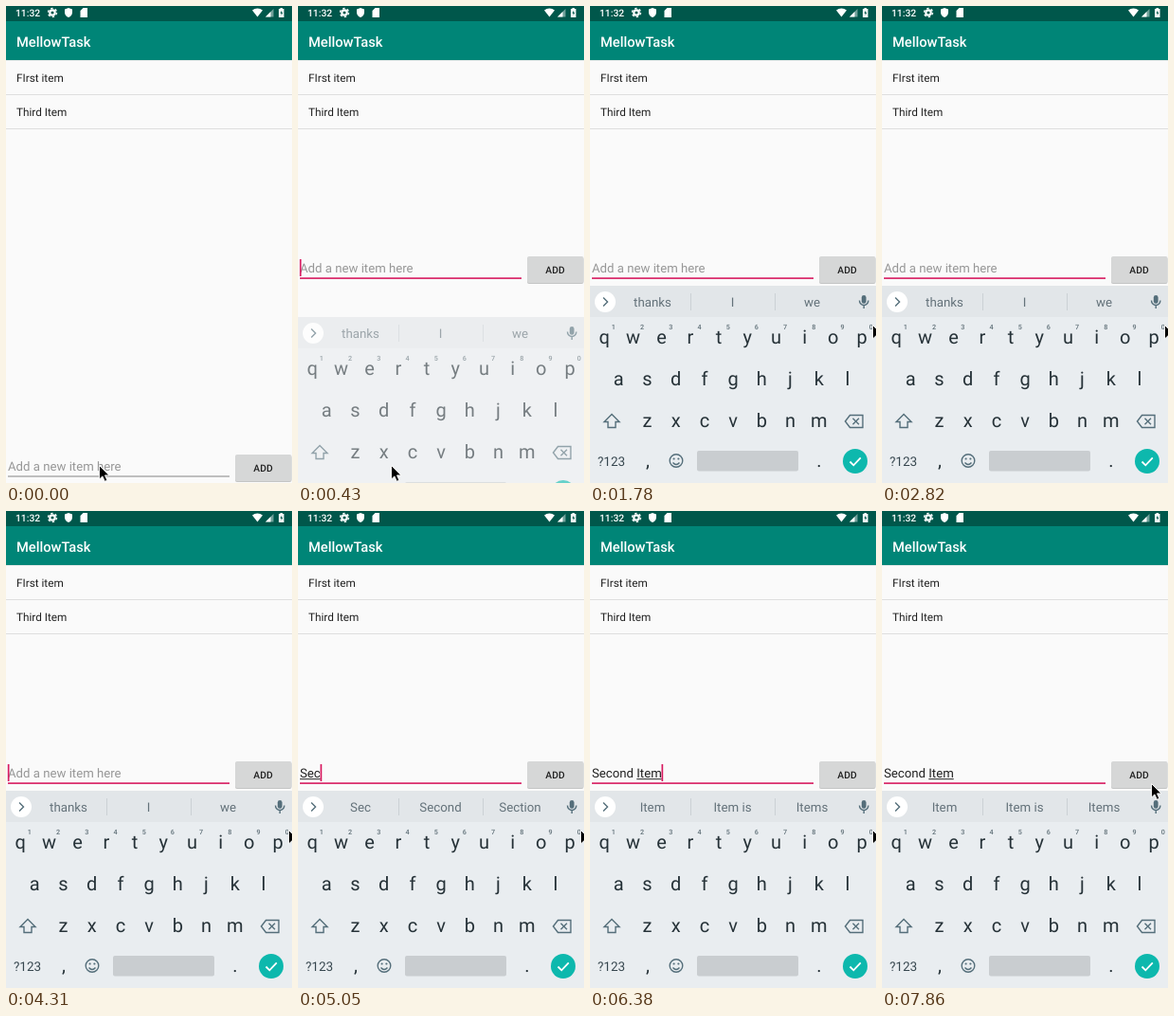
Animation of 302 by 503 pixels, one loop 8 s. Source, as an HTML page:

```html
<!DOCTYPE html>
<html lang="en">
<head>
<meta charset="utf-8">
<title>Todo list</title>
<style>
  html, body { margin: 0; width: 100%; height: 100%; overflow: hidden; background: #fafafa; }
  svg { display: block; width: 302px; height: 503px; }
  text { font-family: Roboto, sans-serif; white-space: pre; text-rendering: geometricPrecision; }
  .mid { text-anchor: middle; }
  .bold { font-weight: 500; }
  .item { font-size: 11.75px; fill: #212121; }
  .field { font-size: 13.2px; }
  .word { font-size: 13.3px; fill: #64727a; }
  .key { font-size: 20px; fill: #263238; }
  .digit { font-size: 7.2px; font-weight: 500; fill: #607078; }
  .line { fill: none; stroke: #546e7a; stroke-width: 1.4; }
</style>
</head>
<body>
<svg viewBox="0 0 302 503">
  <rect width="302" height="503" fill="#fafafa"/>
  <rect y="57" width="302" height="1" fill="#e4e8e8"/>
  <rect width="302" height="57" fill="#008577"/>
  <rect width="302" height="16" fill="#00574b"/>

  <g fill="#fff">
    <text class="bold" x="10" y="11" font-size="10.3">11:32</text>
    <circle cx="49" cy="7" r="2.7" fill="none" stroke="#fff" stroke-width="2.2"/>
    <circle cx="49" cy="7" r="4.5" fill="none" stroke="#fff" stroke-width="1.4" stroke-dasharray="2.356"/>
    <path d="M66 2l4 1.6v3.2c0 2.5-1.7 4.4-4 5.2-2.3-.8-4-2.7-4-5.2V3.600z"/>
    <path d="M81.500 2H86v10h-7.500V5z"/>
    <path d="M260 4.600a8 8 0 0 1 11 0L265.500 11.500z"/>
    <path d="M274 11.500L282.500 3v8.500z" opacity=".45"/>
    <path d="M274 11.500L279.500 6v5.500z"/>
    <path d="M288 3h1.500V2h2.500v1h1.500v9H288z"/>
    <text class="bold" x="11" y="42.500" font-size="14.7">MellowTask</text>
  </g>
  <path d="M291.200 4.500l-1.700 3.300h1.200v2.200l1.700-3.300h-1.200z" fill="#00574b"/>

  <text class="item" x="11" y="79.500">FIrst item</text>
  <text class="item" x="11" y="116">Third Item</text>
  <path d="M0 93.500h302M0 129.500h302" stroke="#dedede"/>

  <g id="entry">
    <rect id="rule" x="2" width="234"/>
    <text id="hint" class="field" x="2" y="281" fill="#979797">Add a new item here</text>
    <text id="typed" class="field" x="2" y="281" fill="#212121"></text>
    <rect id="compose" y="282.200" height="1" fill="#212121"/>
    <rect id="caret" y="267" width="1.700" height="18" fill="#d81b60"/>
    <rect x="242" y="265" width="59.500" height="28" rx="2" fill="#c4c5c5"/>
    <rect x="242" y="264" width="59.500" height="28" rx="2" fill="#d6d7d7"/>
    <text class="mid bold" x="271.500" y="281.500" font-size="10.3" fill="#212121">ADD</text>
  </g>

  <g id="board">
    <rect y="295" width="302" height="208" fill="#e9edf0"/>
    <rect y="295" width="302" height="33" fill="#e2e6e9"/>
    <circle cx="16" cy="312" r="11" fill="#fff"/>
    <path class="line" d="M14 307.500l4.500 4.500-4.500 4.500"/>
    <path d="M106.500 303v18M195.500 303v18" stroke="#cbd1d5"/>
    <g id="words"></g>
    <rect x="286.800" y="305" width="4.800" height="8.800" rx="2.400" fill="#546e7a"/>
    <path class="line" stroke-width="1.3" d="M284.500 310.500a4.700 5 0 0 0 9.400 0M289.200 315.500v3.500"/>
    <g id="keys"></g>
    <path class="line" d="M23 430.500l-8 8h4v6h8v-6h4z"/>
    <path class="line" d="M269.500 438l5-6.500h13.500v13h-13.500zM277.500 434.700l6.500 6.500m0-6.500l-6.500 6.500"/>
    <text class="mid" x="22.500" y="484.500" font-size="13.500" fill="#37474f">?123</text>
    <text class="mid key" x="61" y="486" font-size="18">,</text>
    <text class="mid key" x="242" y="486" font-size="18">.</text>
    <circle class="line" cx="91" cy="479.500" r="6.800"/>
    <path class="line" d="M87.500 481.500q3.500 4 7 0"/>
    <circle cx="88.600" cy="477.500" r="1.100" fill="#546e7a"/>
    <circle cx="93.400" cy="477.500" r="1.100" fill="#546e7a"/>
    <rect x="113" y="469" width="107" height="21.500" rx="2" fill="#c9cdd0"/>
    <circle cx="280" cy="480" r="13" fill="#0db8ad"/>
    <path d="M274.500 480.500l3.800 3.800 7.500-8" fill="none" stroke="#fff" stroke-width="1.800"/>
  </g>

  <path id="mouse" d="M0 0V14.500L3.400 11.400 5.800 16.800 8.400 15.700 6 10.400H10.500z" fill="#000" stroke="#fff" stroke-width=".9"/>
</svg>

<script>
const LOOP = 8000;
const $ = id => document.getElementById(id);

function label(parent, cls, x, y, str) {
  const el = document.createElementNS('http://www.w3.org/2000/svg', 'text');
  el.setAttribute('class', cls);
  el.setAttribute('x', x);
  el.setAttribute('y', y);
  el.textContent = str;
  parent.append(el);
  return el;
}

function set(el, attrs) {
  for (const name in attrs) el.setAttribute(name, attrs[name]);
}

const show = (el, on) => set(el, { visibility: on ? 'visible' : 'hidden' });

// Each row: letters, first centre, baseline
[['qwertyuiop', 15.2, 356], ['asdfghjkl', 30.3, 399.5], ['zxcvbnm', 60.5, 443.5]].forEach(([row, x, y], r) => {
  [...row].forEach((ch, i) => {
    const cx = x + i * 30.2;
    label($('keys'), 'mid key', cx, y, ch);
    if (r === 0) label($('keys'), 'mid digit', cx + 9.700, 341, (i + 1) % 10);
  });
});
const words = [66, 150.5, 234.5].map(x => label($('words'), 'mid word', x, 316.500, ''));

// Tracks of [start time, value]; a value holds until the next one
const mouse = [
  [0, [98.5, 484.5]], [1180, [205, 412]], [1330, [298.5, 336.5]],
  [7570, [295, 322]], [7720, [287, 296]], [7860, [284.5, 287.5]]
];
const board = [[0, null], [430, [33, .62]], [580, [6, .96]], [730, [0, 1]]];
const caret = [
  [0, 0], [290, 1], [730, 0], [1330, 1], [1780, 0], [2220, 1], [2820, 0],
  [3270, 1], [3710, 0], [4310, 1], [6980, 0], [7420, 1], [7860, 0]
];
// Committed text, word being composed, suggestions
const typing = [
  [0, ['', '', 'thanks|I|we']],
  [4610, ['', 'S', 'S|So|See']],
  [4900, ['', 'Se', 'Se|See|Second']],
  [5050, ['', 'Sec', 'Sec|Second|Section']],
  [5200, ['', 'Seco', 'Seco|Second|Seconds']],
  [5340, ['', 'Second', 'Second|Seconds|Secondary']],
  [5640, ['Second ', '', 'time|one|half']],
  [5940, ['Second ', 'I', 'I|In|Instead']],
  [6240, ['Second ', 'Ite', 'Ite|Item|Items']],
  [6380, ['Second ', 'Item', 'Item|Item is|Items']]
];

const at = (track, t) => track.findLast(([start]) => start <= t)[1];

function measure(str) {
  $('typed').textContent = str;
  return str ? $('typed').getComputedTextLength() : 0;
}

function draw(t) {
  const focused = t >= 140;
  set($('entry'), { transform: `translate(0 ${t < 290 ? 209 : 0})` });
  set($('rule'), focused
    ? { y: 286.3, height: 1.6, fill: '#d81b60' }
    : { y: 286.5, height: 1, fill: '#858585' });

  const [done, word, hints] = at(typing, t);
  const start = measure(done), end = measure(done + word);
  show($('hint'), !(done + word));
  set($('compose'), { x: 2 + start, width: end - start });
  set($('caret'), { x: 1.8 + end });
  show($('caret'), at(caret, t));
  hints.split('|').forEach((str, i) => words[i].textContent = str);

  const slide = at(board, t);
  show($('board'), slide);
  if (slide) set($('board'), { transform: `translate(0 ${slide[0]})`, opacity: slide[1] });
  set($('mouse'), { transform: `translate(${at(mouse, t)})` });
}

function tick() {
  draw(performance.now() % LOOP);
  requestAnimationFrame(tick);
}
tick();
</script>
</body>
</html>
```
